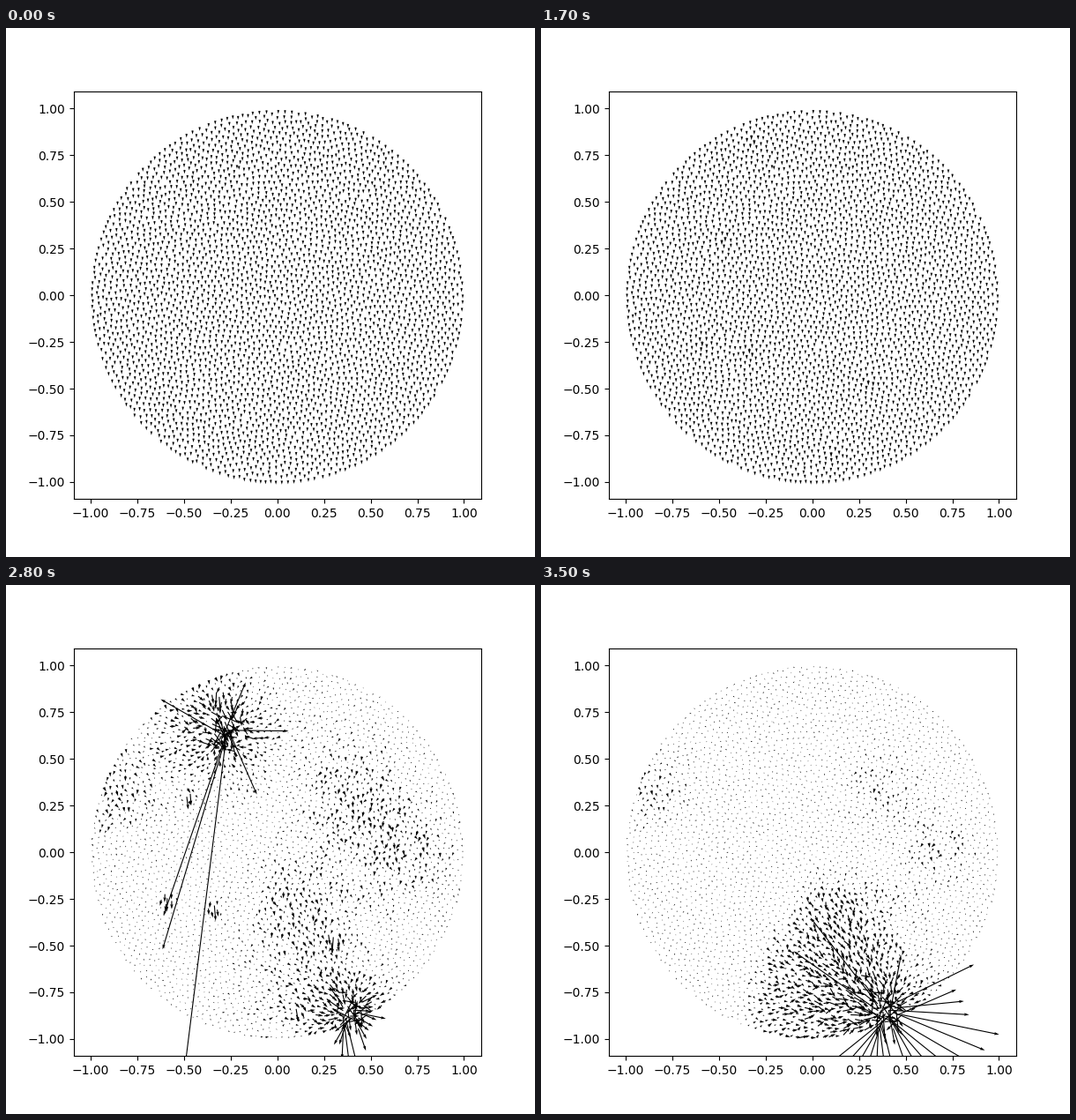
These frames come from a looping animation (600x600 px, 3600 ms). A matplotlib script:

```python
import numpy as np
import matplotlib.pyplot as plt
from matplotlib.animation import FuncAnimation

FRAMES = 36
COUNT = 3400
GAP = np.sqrt(np.pi / COUNT)
BASE = 2.182 / (1.8 * np.sqrt(COUNT))
DOWN = -1j
HOT_A = -0.27 + 0.64j
HOT_B = 0.40 - 0.87j

rng = np.random.default_rng(7)


def scatter_disc():
    """Evenly spread but irregular points in the unit disc, as complex numbers."""
    i = np.arange(COUNT) + 0.5
    z = np.sqrt(i / COUNT) * np.exp(1j * i * np.pi * (3 - np.sqrt(5)))
    z += 0.35 * GAP * (rng.normal(size=COUNT) + 1j * rng.normal(size=COUNT))
    for _ in range(6):
        push = np.empty_like(z)
        for part in np.array_split(np.arange(COUNT), 8):
            d = z[part, None] - z
            near = np.exp(-(d.real ** 2 + d.imag ** 2) / (0.7 * GAP) ** 2)
            push[part] = (d * near).sum(axis=1)
        z += 0.5 * push
        z /= np.maximum(1, np.abs(z) / 0.993)
    return z


pts = scatter_disc()
gain = rng.uniform(0.55, 1.4, COUNT)
sway = np.exp(1j * rng.normal(0, 0.3, COUNT))
spin = np.exp(2j * np.pi * rng.random(COUNT))
burst = rng.uniform(0.3, 1.3, COUNT)


def blobs(centers, sigma):
    return sum(np.exp(-np.abs(pts - c) ** 2 / (2 * sigma ** 2)) for c in centers)


def inflow(center, amp, near, wide):
    """Arrows drawn towards a hot spot, reaching further up and left."""
    d = pts - center
    dist = np.abs(d) + 1e-6
    reach = near + wide * np.clip((0.4 * d.imag - d.real) / dist, 0, 1)
    fade = 1 / (1 + np.exp((dist - 0.75) / 0.03))
    return -amp * gain * fade * np.exp(-dist / reach) * d / dist * sway


def core(center, size):
    """Disordered arrows right at a hot spot."""
    return size * burst * spin * np.exp(-(np.abs(pts - center) / 0.11) ** 4)


# Weak spots that stretch early, and regions that keep pointing down
sparks = DOWN * blobs([-0.48 + 0.31j, -0.59 - 0.25j, -0.34 - 0.29j,
                       0.30 - 0.46j, 0.11 - 0.84j, -0.32 + 0.84j], 0.022)
sites = [-0.85 + 0.35j, 0.36 + 0.36j, 0.10 - 0.27j, 0.68 + 0.02j]


def fading(sigma, size):
    return DOWN * size * gain * sway * blobs(sites, sigma) + 0.007 * gain * spin


def late(k):
    return (fading(0.13, 0.016 * k) + inflow(HOT_B, 0.08, 0.17, 0.31)
            + core(HOT_B, 0.12))


calm = np.full(COUNT, BASE * DOWN)
stirred = calm + 0.008 * sparks
uneven = (BASE * DOWN * (0.3 + 0.6 * gain) * sway ** 0.5 + 0.05 * sparks
          + core(HOT_A, 0.025) + core(HOT_B, 0.015))
torn = (fading(0.2, 0.018) + 0.08 * sparks
        + inflow(HOT_A, 0.075, 0.15, 0.06) + core(HOT_A, 0.09)
        + inflow(HOT_B, 0.075, 0.14, 0.08) + core(HOT_B, 0.08))

# Long arrows: some with set tips, the rest a fan below and right of HOT_B
tips_a = np.array([-0.52 - 1.35j, -0.615 - 0.52j, -0.61 - 0.34j, -0.625 + 0.82j,
                   -0.17 + 0.91j, 0.06 + 0.65j, -0.11 + 0.31j])
tips_b = np.array([-0.01 - 0.35j, -0.10 - 0.53j, 0.475 - 0.55j])
fan = np.exp(1j * np.radians(np.linspace(-140, 30, 18)))
fan_tips = HOT_B + 0.05 * fan + rng.uniform(0.28, 0.58, fan.size) * fan

tips = np.concatenate([tips_a, tips_b, fan_tips])
is_a = np.arange(tips.size) < tips_a.size
home = np.where(is_a, HOT_A, HOT_B)
aim = (tips - home) / np.abs(tips - home)
tails = home + 0.05 * np.where(is_a, 0, aim) + 0.02 * (
    rng.normal(size=tips.size) + 1j * rng.normal(size=tips.size))
rays = tips - tails

# Arrows that point down break out first
plunge = np.exp(-(np.angle(aim * 1j) / 0.3) ** 2)
early = np.where(is_a, 0.06 + 0.12 * plunge, 0.4 * plunge)
middle = np.where(is_a, 1, 0.2 + 0.6 * plunge)
final = np.where(is_a, 0, 1)
none = np.zeros(tips.size)

# time, field, share of the long arrows, easing power of the way there
stages = [
    (8, calm, none, 1),
    (17, stirred, none, 2),
    (26, uneven, early, 3),
    (28, torn, middle, 1.6),
    (32, late(1.0), final, 0.6),
    (35, late(0.85), final, 1),
]


def state(t):
    t = max(t, stages[0][0])
    for (t0, f0, s0, _), (t1, f1, s1, power) in zip(stages, stages[1:]):
        if t <= t1:
            w = ((t - t0) / (t1 - t0)) ** power
            return f0 + w * (f1 - f0), s0 + w * (s1 - s0)


fig, ax = plt.subplots(figsize=(6, 6), dpi=100)
ax.set_aspect("equal")
ax.set_xlim(-1.0924, 1.0898)
ax.set_ylim(-1.0902, 1.0920)


def arrows(at, vec, **kw):
    return ax.quiver(at.real, at.imag, vec.real, vec.imag, angles="uv",
                     scale_units="xy", scale=1, units="width", width=0.0024,
                     color="black", **kw)


field = arrows(pts, calm)
long_arrows = arrows(tails, 0 * rays, minlength=0)


def update(n):
    vectors, share = state(n)
    stretched = rays * share
    field.set_UVC(vectors.real, vectors.imag)
    long_arrows.set_UVC(stretched.real, stretched.imag)
    return field, long_arrows


anim = FuncAnimation(fig, update, frames=FRAMES, interval=100,
                     repeat=True, repeat_delay=0, blit=False)
plt.show()
```
